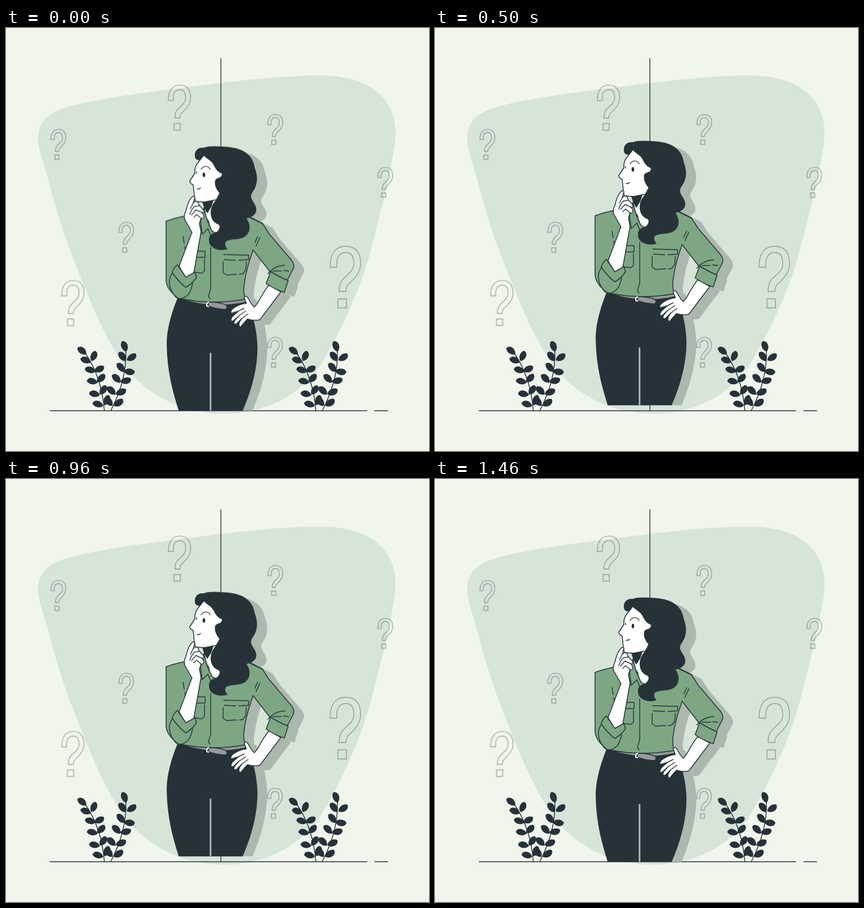
An HTML page without scripts for the animation above (1.5 s loop, 748x748 px).

```html
<!DOCTYPE html>
<html lang="en">
<head>
<meta charset="utf-8">
<title>Thinking woman</title>
<style>
  html, body { margin: 0; width: 100%; height: 100%; overflow: hidden; background: #f0f6ec; }
  svg { display: block; width: 100%; height: 100%; }
  .marks { fill: none; stroke: #263238; stroke-width: 1.4; opacity: .4; }
  #mark { vector-effect: non-scaling-stroke; }
  .line { fill: none; stroke: #263238; stroke-width: 1.4; stroke-linecap: round; stroke-linejoin: round; }
  .dark { fill: #263238; }
  .skin { fill: #fff; }
  .shirt { fill: #7da783; }
  .belt { fill: #97999b; }
  .shadow { fill: #acb8ae; }
  .outlined { stroke: #263238; stroke-width: 1.5; stroke-linejoin: round; stroke-linecap: round; }
  .woman { animation: bob 1.5s linear infinite; }
  @keyframes bob {
    0%, 100% { transform: translateY(-.4px); }
    48.7% { transform: translateY(-14.5px); }
    97.3% { transform: translateY(0); }
  }
</style>
</head>
<body>
<svg viewBox="0 0 748 748">
  <defs>
    <path id="mark" d="M0 37C0 12 10 0 28 0C46 0 54 12 54 30C54 45 47 53 37 63C30 69 28 72 28 80H16C16 66 20 60 28 53C36 46 42 41 42 31C42 18 38 11 28 11C18 11 12 18 12 30V37ZM14 93H29V109H14Z"/>
    <path id="leaf" d="M0 0C4-7 14-8 19-3C20 5 7 9 0 0Z"/>
    <!-- A twig grows from its own origin -->
    <g id="twig">
      <path class="line" d="M0 0C-3-37-13-72-34-102"/>
      <g class="dark">
        <use href="#leaf" transform="translate(-32-100)rotate(-137)"/>
        <use href="#leaf" transform="translate(-24-86)rotate(-155)"/>
        <use href="#leaf" transform="translate(-23-88)rotate(-62)"/>
        <use href="#leaf" transform="translate(-16-69)rotate(-157)"/>
        <use href="#leaf" transform="translate(-18-70)rotate(-20)"/>
        <use href="#leaf" transform="translate(-12-50)rotate(-163)"/>
        <use href="#leaf" transform="translate(-13-51)rotate(-40)"/>
        <use href="#leaf" transform="translate(-8-28)rotate(-165)"/>
        <use href="#leaf" transform="translate(-8-29)rotate(-50)"/>
        <use href="#leaf" transform="translate(-2-9)rotate(-160)"/>
        <use href="#leaf" transform="translate(0-10)rotate(-62)"/>
      </g>
    </g>
    <g id="plant">
      <use href="#twig" transform="translate(174 677)"/>
      <use href="#twig" transform="translate(185 677)rotate(32.5)scale(1.03)"/>
    </g>
    <path id="hair" d="M334 228C333 217 339 211 350 212C356 209 366 209 382 210C407 211 421 216 430 226C437 233 439 242 440 248C446 263 445 277 437 289C431 297 433 301 438 309C447 323 443 333 425 337C432 345 433 359 426 366C417 376 403 372 390 377C386 380 387 387 392 391C379 396 364 391 360 382C357 371 360 364 371 362C377 358 380 352 376 348C361 343 360 326 364 316C367 307 376 302 378 293C371 285 368 277 370 269C374 264 382 266 382 258C369 253 369 242 363 237C358 232 354 231 350 226L343 234C338 234 335 233 334 228Z"/>
    <path id="torso" d="M283 342Q299 336 320 332L346 329L365 350L430 334L454 346L460 375L438 390C431 410 424 430 421 455Q419 466 423 480Q363 491 304 478Q300 477 297 472Q282 458 283 444Z"/>
    <path id="sleeve" d="M428 334L453 346Q457 351 465 364L505 411Q512 420 507 428L496 449L468 433L437 393"/>
    <path id="cuff" d="M468 431Q484 441 499 447L492 468Q474 462 460 452Z"/>
    <path id="arm" d="M465 455C455 467 449 480 444 488L439 494Q433 488 428 478Q424 472 421 477L425 487Q411 489 402 496Q396 501 398 505L411 501L400 511Q395 518 401 519L412 509L405 517Q400 525 407 524L417 514L413 520Q410 528 415 529Q422 520 427 515Q440 519 449 516L486 467Z"/>
    <path id="pants" d="M304 478C291 510 284 540 285 563C286 610 296 645 306 676.5H418C433 642 444 602 444 565C443 535 437 510 424 479Q364 494 304 478Z"/>
  </defs>

  <path fill="#d7e5d9" d="M57 190C59 160 83 146 118 137C190 119 290 109 380 97C450 89 510 84 552 84C640 83 688 122 689 183C688 225 668 305 646 390C625 468 590 540 555 598C515 655 450 682 386 682C310 682 255 650 215 605C170 545 140 460 115 398C95 345 83 300 71 255C62 225 56 210 57 190Z"/>
  <path class="line" d="M380 54V677M78 676.8H638M652 676.8H675"/>
  <use href="#plant"/>
  <use href="#plant" x="374"/>

  <g class="woman">
    <g class="shadow" transform="translate(18 8)">
      <use href="#hair"/><use href="#torso"/><use href="#sleeve"/>
      <use href="#cuff"/><use href="#arm"/><use href="#pants" y="-7.5"/>
    </g>

    <use href="#pants" class="dark outlined"/>
    <path fill="none" stroke="#acb8ae" stroke-width="3" stroke-linecap="round" d="M361.7 576V675.5"/>
    <path class="belt outlined" d="M304 478Q363 491 424 479L425 485Q390 493 357 490Q330 487 304 478Z"/>
    <use href="#torso" class="shirt outlined"/>
    <path class="belt outlined" d="M358 485Q377 485 389 490Q393 495 388 498Q370 497 358 492Z"/>
    <path fill="none" stroke="#fff" stroke-width="2" d="M359 485Q354 486 355 492L359 493"/>

    <use href="#sleeve" class="shirt outlined"/>
    <use href="#arm" class="skin outlined"/>
    <path class="line" d="M411 501L421 496M412 509L424 501M417 514L428 506"/>
    <use href="#cuff" class="shirt outlined"/>

    <g class="line">
      <path d="M362 389V461L358 475L361 479M313 369L315 381M316 387L319 404M449 371L442 386M445 369L440 380"/>
      <path d="M336 395H352V406H335M351 409V430L346 434L332 432"/>
      <path d="M385 401L429 402V410L412 411M406 411L386 410M384 414V433L390 437L408 436M413 436L419 435L424 428L425 414"/>
      <path d="M463 435Q474 421 493 420M472 430L487 430M491 429L500 430"/>
    </g>

    <!-- Neck, collar and face -->
    <path class="skin" d="M351 312L367 304L380 340L376 362L365 363Z"/>
    <path class="dark" d="M347 307L368 302L363 317L356 328Q350 320 347 307Z"/>
    <path class="shirt outlined" d="M350 318L344 342L347 365L357 355L363 370L372 363L365 360Q355 345 350 318Z"/>
    <path class="skin outlined" d="M350 225L339 239Q333 247 334 257L325 271Q324 274 331 278L332 287Q333 300 335 307L351 308L372 304L390 270L375 238Z"/>
    <use href="#hair" class="dark"/>
    <ellipse class="dark" cx="350" cy="260" rx="2.3" ry="4"/>
    <path class="line" d="M345 250C350 243 358 244 361 250M337 255V258M338 285Q342 286 344 283"/>

    <!-- Raised arm -->
    <path class="skin outlined" d="M329 361L306 422L318 442L332 434L338 400L345 360Z"/>
    <path class="skin outlined" d="M329 362L316 339Q314 332 318 324C320 315 324 304 329 299Q334 296 334 300L331 310L335 307Q340 306 341 313L349 322Q352 327 347 327L350 333Q350 338 345 337L342 346L345 361"/>
    <path class="line" d="M331 310L326 320M341 315L333 316Q328 321 325 330M347 327L336 322L328 331M345 337L337 330L332 335"/>
    <path class="shirt" d="M284 436L295 433L334 450L324 472Q315 481 304 478Q283 463 284 436Z"/>
    <path class="line" d="M330 452Q327 466 322 472Q312 481 304 478Q290 468 289 452Q288 442 295 433"/>
    <path class="shirt outlined" d="M303 419Q295 426 294 433Q306 450 318 459Q330 452 337 441L334 432L318 441Z"/>
  </g>

  <g class="marks">
    <use href="#mark" transform="translate(573 386)"/>
    <use href="#mark" transform="translate(287 101)scale(.73)"/>
    <use href="#mark" transform="translate(98.5 446.5)scale(.73)"/>
    <use href="#mark" transform="translate(79.5 179.5)scale(.485)"/>
    <use href="#mark" transform="translate(463 153)scale(.485)"/>
    <use href="#mark" transform="translate(657.5 246.5)scale(.485)"/>
    <use href="#mark" transform="translate(199.5 343.5)scale(.485)"/>
    <use href="#mark" transform="translate(462.5 547)scale(.485)"/>
  </g>
</svg>
</body>
</html>
```
